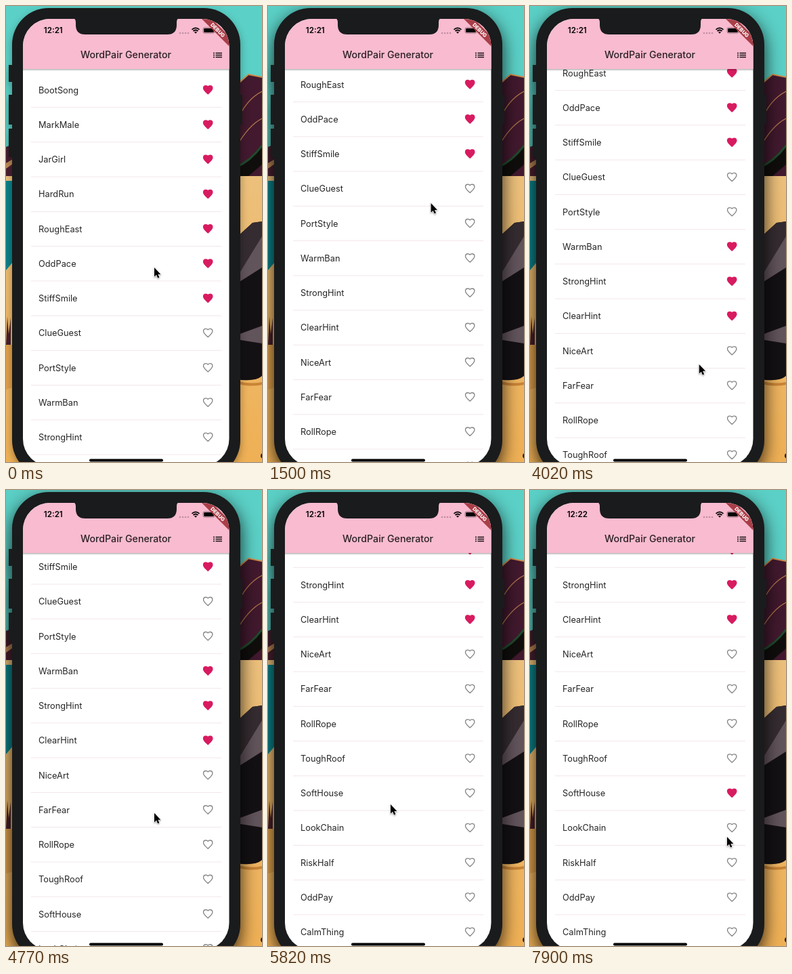
These frames come from a looping animation (378 px wide and 673 px high, 8 s). An HTML page:

```html
<!DOCTYPE html>
<html lang="en">
<head>
<meta charset="utf-8">
<title>WordPair Generator</title>
<style>
  html, body { margin: 0; width: 100%; height: 100%; overflow: hidden; }
  svg { display: block; width: 100vw; height: 100vh; font-family: Inter, Roboto, sans-serif; }
  .row text { font-size: 12.8px; fill: #262626; }
  .row path { fill: none; stroke: #858585; stroke-width: 2; }
  .row .fav { fill: #d81b60; stroke: #d81b60; }
  .row line { stroke: #f3e6ea; }
  #phone { filter: drop-shadow(0 5px 6px #0005); }
  #phone.active { filter: drop-shadow(0 9px 13px #000c); }
</style>
</head>
<body>
<svg viewBox="0 0 378 673">
  <defs>
    <clipPath id="screen"><rect x="25" y="19" width="304.5" height="660" rx="40"/></clipPath>
    <clipPath id="list"><rect x="25" y="93" width="305" height="580"/></clipPath>
    <linearGradient id="sand" x2="0" y2="1">
      <stop stop-color="#ecc07c"/><stop offset="1" stop-color="#efb055"/>
    </linearGradient>
    <linearGradient id="barShadow" x2="0" y2="1">
      <stop stop-color="#000" stop-opacity=".3"/><stop offset="1" stop-color="#000" stop-opacity="0"/>
    </linearGradient>
  </defs>

  <!-- desert wallpaper, left then right -->
  <rect width="378" height="673" fill="#5bd0c6"/>
  <rect y="251" width="378" height="422" fill="url(#sand)"/>
  <path d="M0 208l20-8v51H0z" fill="#4a2030"/>
  <path d="M0 232l20-12v6L0 240z" fill="#c08a56"/>
  <path d="M0 258h20V366L0 390z" fill="#0b8088"/>
  <path d="M0 500l2-42 2 26 3-24v40z" fill="#45202c"/>
  <path d="M0 500h20v60L0 566z" fill="#e0a04c"/>
  <path d="M340 118l18-17 20 4V251h-38z" fill="#42192e"/>
  <path d="M340 117l18-16 20 4" fill="none" stroke="#d08a48" stroke-width="2"/>
  <path d="M340 172q14-34 38-46M340 208q18-32 38-42" fill="none" stroke="#b5794a" stroke-width="1.3"/>
  <path d="M340 238q22-10 38-32v28l-20 17h-18z" fill="#100e0c"/>
  <path d="M340 238q22-10 38-32" fill="none" stroke="#1f4a2c" stroke-width="3"/>
  <path d="M340 342l24-22 14-2V546q-10 9-38 5z" fill="#141114"/>
  <path d="M340 342l24-22 14-2v24l-38 62z" fill="#352c31"/>
  <path d="M340 402l38-62v46l-38 24zM340 486l38-14v26l-38-6z" fill="#62545b"/>
  <path d="M340 555q20 6 38 2" fill="none" stroke="#c98436" stroke-width="4"/>
  <circle cx="380" cy="664" r="4" fill="#221a16"/>

  <g id="phone" fill="#1a1b1c">
    <path d="M4 87h6v25H4zM4 131h6v44H4zM4 181h6v42H4zM344 131h5v44h-5z"/>
    <rect x="9" y="3" width="337" height="692" rx="54"/>
  </g>

  <g clip-path="url(#screen)">
    <rect x="25" y="19" width="305" height="660" fill="#fff"/>
    <g clip-path="url(#list)"><g id="rows"></g></g>
    <rect x="25" y="93" width="305" height="3" fill="url(#barShadow)"/>
    <rect x="25" y="19" width="305" height="74" fill="#f8bbd0"/>
    <text x="177" y="77" font-size="14.2" font-weight="500" text-anchor="middle" fill="#2b2024">WordPair Generator</text>
    <path d="M306 69.5h2m1.5 0H319M306 72.5h2m1.5 0H319M306 75.5h2m1.5 0H319" stroke="#161012" stroke-width="1.6"/>

    <text id="clock" x="69.8" y="40.4" font-size="11.6" font-weight="600" text-anchor="middle"></text>
    <path d="M257 40h.01m4 0h.01m4 0h.01m4 0h.01" stroke="#c08fa2" stroke-width="2.6" stroke-linecap="round"/>
    <path d="M274.5 34.8q5.5-4.8 11 0M276.5 37q3.5-3 7 0" fill="none" stroke="#000" stroke-width="1.7"/>
    <path d="M278 38.6q2-1.6 4 0l-2 2.2z"/>
    <rect x="291" y="31.8" width="17" height="8.4" rx="2.4" fill="none" stroke="#7d5f69" stroke-width=".8"/>
    <rect x="292.2" y="33" width="14.6" height="6" rx="1.3"/>
    <path d="M289 19h15l26 26v15z" fill="#a93e48"/>
    <text transform="translate(312.7 35.6) rotate(45)" y="2.7" font-size="7.6" font-weight="800" text-anchor="middle" fill="#fff">DEBUG</text>
    <rect x="123" y="668.6" width="109" height="3.8" rx="1.9"/>
  </g>
  <path d="M98 18q5 0 5 6v4q0 14 14 14H238q14 0 14-14v-4q0-6 5-6z" fill="#1a1b1c"/>

  <path id="cursor" d="M0 0V13.6l3.1-2.8 2 4.7 2.3-1-2-4.6H9.4z" stroke="#fff" stroke-width="1.2" paint-order="stroke" style="filter:drop-shadow(0 1px 1px #0006)"/>
</svg>
<script>
const LOOP = 8000, STEP = 149, PITCH = 51.25, FAVOURITES = 7;
const words = ("BootSong MarkMale JarGirl HardRun RoughEast OddPace StiffSmile ClueGuest PortStyle WarmBan " +
  "StrongHint ClearHint NiceArt FarFear RollRope ToughRoof SoftHouse LookChain RiskHalf OddPay CalmThing").split(" ");
const heart = "M12 21.35l-1.45-1.32C5.4 15.36 2 12.28 2 8.5 2 5.42 4.42 3 7.5 3c1.74 0 3.41.81 4.5 2.09" +
  "C13.09 3.81 14.76 3 16.5 3 19.58 3 22 5.42 22 8.5c0 3.78-3.4 6.86-8.55 11.54z";

const $ = id => document.getElementById(id);
const progress = (step, start, end) => Math.min(1, Math.max(0, (step - start) / (end - start)));
const rowY = i => 124 + i * PITCH;

// All times are in steps. The list follows each drag, then coasts to a stop.
const drags = [
  { start: 0, release: 6, rest: 13, distance: 137.75, coast: 92.25 },
  { start: 30, release: 35, rest: 39, distance: 220.25, coast: 46.25 }
];
const scrollAt = step => drags.reduce((sum, d) => sum +
  d.distance * progress(step, d.start, d.release) +
  d.coast * (1 - (1 - progress(step, d.release, d.rest)) ** 2), 0);

const move = (start, end, x, y) => ({ start, end, x, y });
// Moves onto a word's heart, which fills shortly after the pointer arrives.
const tap = (start, end, word) => {
  const row = words.indexOf(word);
  return { ...move(start, end, 306, rowY(row) - scrollAt(end) - 4), row };
};
const moves = [
  move(0, 6, 197, 251),
  tap(8, 13, "WarmBan"),
  tap(15, 17, "StrongHint"),
  tap(20, 22, "ClearHint"),
  move(24, 28, 231, 554),
  move(30, 35, 201, 361),
  move(36, 39, 181, 464),
  tap(42, 46, "SoftHouse"),
  move(48, 50, 226, 493),
  move(51, 53, 291, 512)
];

function pointerAt(step) {
  let x = 219, y = 386;
  for (const m of moves) {
    const p = progress(step, m.start, m.end);
    x += (m.x - x) * p;
    y += (m.y - y) * p;
  }
  return `${x} ${y}`;
}

$("rows").innerHTML = words.map((word, i) => `<g class="row" transform="translate(0 ${rowY(i)})">
  <text x="48" y="4.6">${word}</text>
  <path d="${heart}" transform="translate(298.2 -.4) scale(.67) translate(-12 -12)"/>
  <line x1="37" x2="318" y1="25.6" y2="25.6"/></g>`).join("");
const hearts = [...document.querySelectorAll(".row path")];

function draw(now) {
  const step = Math.floor((now % LOOP + 2) / STEP);
  $("rows").setAttribute("transform", `translate(0 ${-scrollAt(step)})`);
  $("cursor").setAttribute("transform", `translate(${pointerAt(step)})`);
  $("clock").textContent = step < 46 ? "12:21" : "12:22";
  $("phone").classList.toggle("active", step > 0);
  hearts.forEach((h, i) => h.classList.toggle("fav",
    i < FAVOURITES || moves.some(m => m.row === i && step >= m.end + 2)));
  requestAnimationFrame(draw);
}
draw(performance.now());
</script>
</body>
</html>
```
